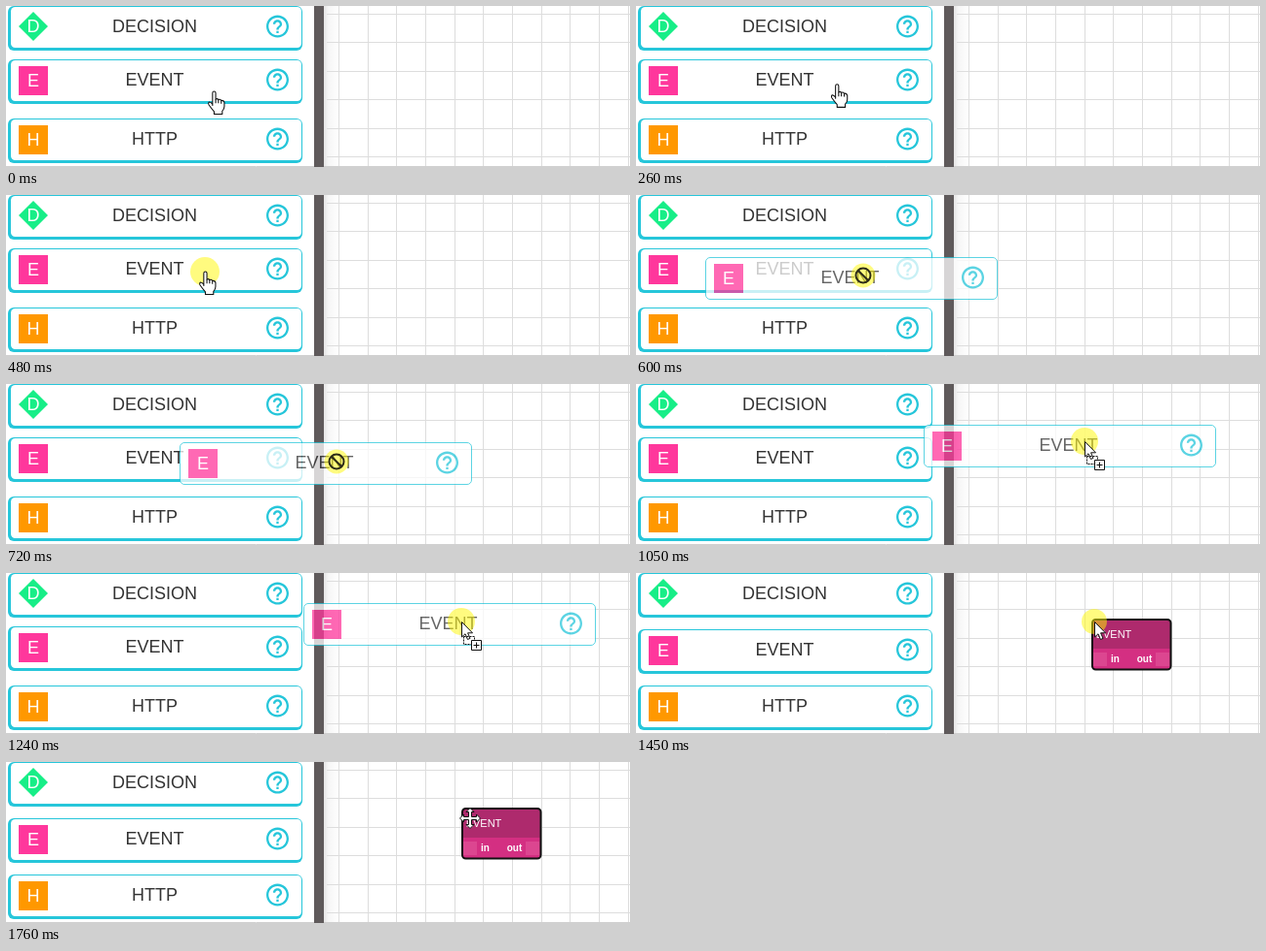
Write an HTML page that moves like this. It is 640x166 px and loops after 3.31 s.

```html
<!DOCTYPE html>
<html lang="en">
<head>
<meta charset="utf-8">
<title>Drag a block onto the canvas</title>
<style>
html, body { margin: 0; width: 100%; height: 100%; overflow: hidden; background: #fff; }
svg { display: block; width: 640px; height: 166px; font: 18px "Liberation Sans", Arial, sans-serif; }
text { fill: #333; text-anchor: middle; }
.w { fill: #fff; }
.cursor { fill: #fff; stroke: #111; stroke-linejoin: round; }
#node { font-size: 10px; font-weight: bold; }
</style>
</head>
<body>
<svg id="stage" viewBox="0 0 640 166">
  <defs>
    <linearGradient id="shade"><stop stop-color="#e6e6e6"/><stop offset=".3" stop-color="#f6f6f6"/><stop offset="1" stop-color="#fff"/></linearGradient>
    <path id="help" fill="#26c6da" transform="translate(264.7 7.3) scale(1.15)" d="M11 18h2v-2h-2v2zm1-16C6.48 2 2 6.48 2 12s4.48 10 10 10 10-4.48 10-10S17.52 2 12 2zm0 18c-4.41 0-8-3.59-8-8s3.59-8 8-8 8 3.59 8 8-3.59 8-8 8zm0-14c-2.21 0-4 1.79-4 4h2c0-1.1.9-2 2-2s2 .9 2 2c0 2-3 1.75-3 5h2c0-2.25 3-2.5 3-5 0-2.21-1.79-4-4-4z"/>
    <g id="frame">
      <rect x="2" width="302" height="46" rx="6" fill="#26c6da"/>
      <rect x="5" y="1" width="298" height="42" rx="4.5" fill="#fff"/>
    </g>
  </defs>
  <rect x="326" width="16" height="166" fill="url(#shade)"/>
  <path id="grid" stroke="#ddd" fill="none"/>
  <path d="M0 165.5H640" stroke="#d0d0d0"/>
  <rect x="316" width="10" height="166" fill="#5f5a5b"/>
  <g id="cards"></g>
  <g id="node">
    <rect x="468" y="48" width="80.5" height="51.5" rx="3.5" fill="#d42f82"/>
    <path d="M468 78V51.5q0-3.5 3.5-3.5H545q3.5 0 3.5 3.5V78Z" fill="#ae2a6d"/>
    <path d="M469 82h14v14h-14zM533 82h14v14h-14z" fill="#dc4690"/>
    <rect x="468" y="48" width="80.5" height="51.5" rx="3.5" fill="none" stroke="#111" stroke-width="2"/>
    <text class="w" x="490" y="67" font-size="11" font-weight="400">EVENT</text>
    <text class="w" x="491.5" y="92">in</text>
    <text class="w" x="521.5" y="92">out</text>
  </g>
  <g id="ghost" opacity=".75"></g>
  <circle id="halo" fill="#fff700" fill-opacity=".5"/>
  <g id="hand" class="cursor">
    <g transform="scale(1.07)">
      <path d="M5 14V2Q5 .5 6.5 .5T8 2V8Q9.5 7 10.5 8.5 12.2 7.6 13.3 9.3 15.5 8.8 16.3 11V15Q16.3 17.5 14.3 19.5V22.500H6.500V20Q4 17 1.500 13.500 .5 11.500 2 10.800 3.500 10.800 5 13Z"/>
      <path d="M8 8v4M10.6 8.5v3.5M13.3 9.3v3" fill="none"/>
    </g>
  </g>
  <g id="ban" fill="none" stroke="#2d2b18" stroke-width="2"><circle r="7.5"/><path d="M-5.3-5.3 5.3 5.3"/></g>
  <g id="arrow" class="cursor">
    <path d="M.5.5V16L4 12.8 6.5 18.5 9 17.4 6.6 11.8H11.5Z"/>
    <g id="copy">
      <path d="M2.5 15.5h11v8h-11z" fill="none" stroke-dasharray="2 1"/>
      <path d="M10.5 19.5h10v10h-10z"/>
      <path d="M12.5 24.5h6M15.5 21.5v6" fill="none"/>
    </g>
  </g>
  <path id="move" class="cursor" d="M0-10.5 4-6.5H1.5V-1.5H6.5V-4L10.5 0 6.5 4V1.5H1.5V6.5H4L0 10.5-4 6.5H-1.5V1.5H-6.5V4L-10.5 0-6.5-4V-1.5H-1.5V-6.5H-4Z"/>
</svg>
<script>
const LOOP = 3310, DROP = 1450;
const $ = id => document.getElementById(id);
const place = (id, x, y) => $(id).setAttribute('transform', `translate(${x} ${y})`);
const show = (id, on) => { $(id).style.display = on ? '' : 'none'; };

// Card contents, relative to the card's top edge
const content = (name, color, diamond) =>
  `<path fill="${color}" d="${diamond ? 'M28 6l15 15-15 15-15-15z' : 'M13 7h30v30H13z'}"/>
   <text class="w" x="28" y="${diamond ? 27 : 28}">${name[0]}</text>
   <text x="152.5" y="27">${name}</text><use href="#help"/>`;

const event = content('EVENT', '#ff379c');
$('cards').innerHTML = [content('DECISION', '#17ee87', true), event, content('HTTP', '#ff9800')]
  .map((c, i) => `<g id="card${i}" transform="translate(0 ${i * 58})"><use href="#frame"/>${c}</g>`).join('');
$('ghost').innerHTML =
  `<rect x="4.5" y=".5" width="299" height="43" rx="4.5" fill="#fff" stroke="#26c6da"/>${event}`;

let lines = '';
for (let i = 0; i < 11; i++) lines += `M${Math.floor(341.5 + i * 29.65) + .5} 0V166`;
for (let i = 0; i < 6; i++) lines += `M329 ${Math.floor(8.2 + i * 29.5) + .5}H640`;
$('grid').setAttribute('d', lines);

// The screen updates in steps: time, ghost x, y, pointer x, y
const drag = [
  [600, 71, 64, 233, 83], [660, 124, 62, 286, 82], [720, 178, 60, 339, 80],
  [780, 230, 56, 394, 76], [840, 276, 52, 441, 71], [930, 283, 49, 448, 68],
  [990, 288, 46, 453, 64], [1050, 295, 42, 460, 59], [1120, 299, 38, 463, 56],
  [1180, 302, 34, 465, 53], [1240, 305, 31, 467, 50], [1330, 307, 28, 469, 47]
];
const approach = [70, 130, 190, 250, 320];

function draw(t) {
  const dropped = t >= DROP, dragging = t >= 600 && !dropped, copying = dragging && t >= 780;
  let x = 204, y = 79;
  place('card1', 0, dropped ? 58 : 55);

  if (t < 600) {
    const k = approach.filter(s => t >= s).length / approach.length;
    const nudge = t >= 540 ? 8 : 0;
    x += nudge;
    place('hand', 206.5 - 9 * k + nudge, 87.5 - 9 * k);
  } else if (dragging) {
    const [, gx, gy, px, py] = drag.filter(d => t >= d[0]).pop();
    [x, y] = [px, py];
    place('ghost', gx - 4, gy);
    place('ban', x, y);
  } else {
    [x, y] = [470, 50];
  }
  place('arrow', x, y);
  place('move', 476, 58);

  $('halo').setAttribute('cx', x);
  $('halo').setAttribute('cy', y);
  $('halo').setAttribute('r', dropped ? 13 : t < 600 ? 15 : t < 780 ? 12.5 : 14);
  $('halo').setAttribute('opacity', t >= 1700 ? .5 : 1);

  show('hand', t < 600);
  show('ghost', dragging);
  show('ban', dragging && !copying);
  show('arrow', copying || dropped && t < 1700);
  show('copy', copying);
  show('node', dropped);
  show('halo', t >= 480 && t < 1760);
  show('move', t >= 1700);
}

const start = performance.now();
(function tick() {
  draw((performance.now() - start) % LOOP);
  requestAnimationFrame(tick);
})();
</script>
</body>
</html>
```
